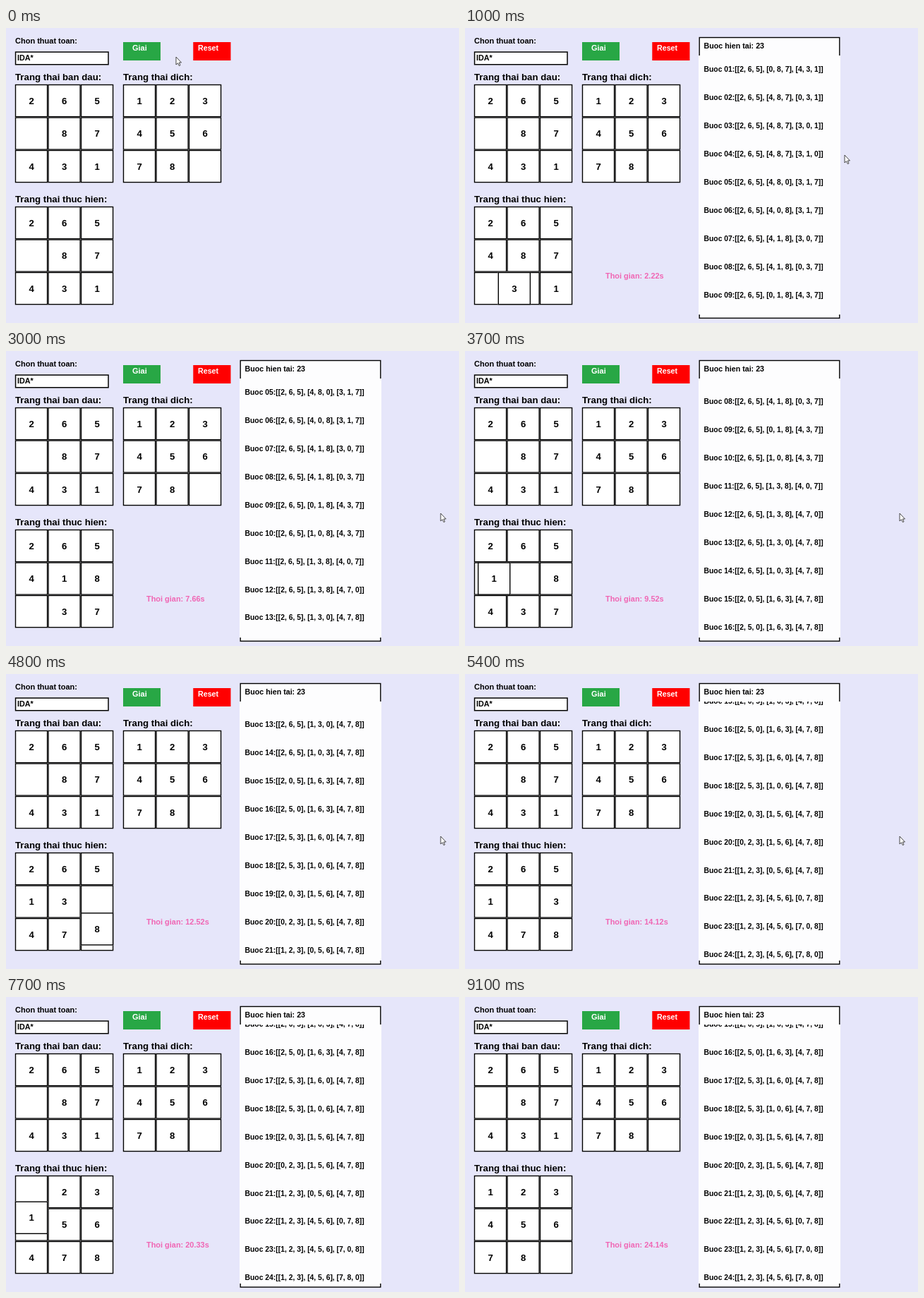
An HTML page with a canvas for the animation above (9.2 s loop, 642 px wide and 418 px high).

```html
<!DOCTYPE html>
<html>
<head>
<meta charset="utf-8">
<style>
html, body { margin: 0; width: 100%; height: 100%; overflow: hidden; background: #e6e6fa; }
canvas { display: block; }
</style>
</head>
<body>
<canvas id="stage" width="642" height="418"></canvas>
<script>
const ctx = document.getElementById('stage').getContext('2d');
const LOOP = 9200, TICK = 100, CELL = 46.5;
const SLIDE = 0.4, PERIOD = 1.0074, FIRST_END = 1.505;
const START = [2, 6, 5, 0, 8, 7, 4, 3, 1];
const GOAL = [1, 2, 3, 4, 5, 6, 7, 8, 0];
const STEP = { U: -3, D: 3, L: -1, R: 1 };

// Follow the blank through every move of the solution.
const states = [START];
for (const dir of 'DRRULDLURDRULURDLULDDRR') {
  const next = states[states.length - 1].slice();
  const from = next.indexOf(0), to = from + STEP[dir];
  next[from] = next[to];
  next[to] = 0;
  states.push(next);
}
const rows = states.map((s, i) => {
  const line = r => '[' + s.slice(r * 3, r * 3 + 3).join(', ') + ']';
  return `Buoc ${String(i + 1).padStart(2, '0')}:[${[0, 1, 2].map(line).join(', ')}]`;
});

const CLOCK = [[180, 0], [1900, 4.66], [3000, 7.66], [3700, 9.52], [4800, 12.52], [6300, 16.52], [9100, 24.14]];
const WHEEL = [[1800, 0], [1900, 1], [3000, 12], [3700, 20], [4800, 35], [5400, 43.5]];
const MOUSE_X = [[0, 241], [150, 200], [400, 200], [1000, 538], [1300, 616]];
const MOUSE_Y = [[0, 41], [150, 31], [400, 31], [1000, 180], [1300, 230]];

function track(keys, t) {
  if (t <= keys[0][0]) return keys[0][1];
  for (let i = 1; i < keys.length; i++) {
    const [t0, a] = keys[i - 1], [t1, b] = keys[i];
    if (t <= t1) return a + (b - a) * (t - t0) / (t1 - t0);
  }
  return keys[keys.length - 1][1];
}

function box(x, y, w, h, fill, border) {
  ctx.fillStyle = fill;
  ctx.fillRect(x, y, w, h);
  if (!border) return;
  ctx.strokeStyle = '#000';
  ctx.lineWidth = border;
  ctx.strokeRect(x + border / 2, y + border / 2, w - border, h - border);
}

function text(str, x, y, size, color = '#000', align = 'left') {
  ctx.font = `bold ${size}px "Liberation Sans", Arial, sans-serif`;
  ctx.textAlign = align;
  ctx.fillStyle = color;
  ctx.fillText(str, x, y + size * 0.36);
}

function tile(n, x, y) {
  box(x, y, CELL, CELL, '#fff', 1.4);
  if (n) text(n, x + CELL / 2, y + CELL / 2, 13.2, '#000', 'center');
}

function board(cells, x, y, target, amount) {
  const at = i => [x + i % 3 * CELL, y + Math.floor(i / 3) * CELL];
  const blank = cells.indexOf(0);
  const moving = amount > 0 ? target.indexOf(0) : -1;
  cells.forEach((n, i) => tile(i === moving ? 0 : n, ...at(i)));
  if (moving < 0) return;
  const [x0, y0] = at(moving), [x1, y1] = at(blank);
  tile(cells[moving], x0 + (x1 - x0) * amount, y0 + (y1 - y0) * amount);
}

function panel(t) {
  box(331.5, 12.8, 200, 399, '#fdfdfe', 1.4);
  box(331, 39, 201, 367, '#fdfdfe');
  text('Buoc hien tai: 23', 338.5, 25, 10.7);
  const wheel = track(WHEEL, t);
  const notches = wheel >= 43.5 ? wheel : Math.round(wheel);
  ctx.save();
  ctx.beginPath();
  ctx.rect(331, 39, 201, 367);
  ctx.clip();
  rows.forEach((row, i) => text(row, 338.5, 58.2 - notches * 13.32 + i * 39.95, 10.36));
  ctx.restore();
}

function pointer(x, y) {
  ctx.beginPath();
  [[0, 0], [0, 11], [2.5, 8.7], [4.3, 12.5], [6, 11.8], [4.3, 8], [7.5, 8]]
    .forEach(([dx, dy]) => ctx.lineTo(x + dx, y + dy));
  ctx.closePath();
  ctx.fillStyle = '#fff';
  ctx.fill();
  ctx.strokeStyle = '#333';
  ctx.lineWidth = 0.9;
  ctx.stroke();
}

function draw(t) {
  box(0, 0, 642, 418, '#e6e6fa');
  text('Chon thuat toan:', 13, 18, 11);
  box(12.8, 33.3, 133, 19.2, '#fff', 1.5);
  text('IDA*', 16, 41.7, 10.8);
  box(166, 20, 53, 26, '#28a745');
  text('Giai', 179, 28, 11, '#fff');
  box(265.3, 20, 53.2, 26, '#f00');
  text('Reset', 272, 28, 10.7, '#fff');

  text('Trang thai ban dau:', 13, 69.3, 13.25);
  text('Trang thai dich:', 166, 69.3, 13.25);
  text('Trang thai thuc hien:', 13, 242.3, 13.25);
  board(START, 12.8, 79.8);
  board(GOAL, 165.8, 79.8);

  const clock = track(CLOCK, t);
  const last = states.length - 1;
  const cycle = (clock - FIRST_END) / PERIOD + 1;
  const done = Math.min(last, Math.max(0, Math.floor(cycle)));
  const left = (done + 1 - cycle) * PERIOD;
  const amount = done < last ? Math.max(0, 1 - left / SLIDE) : 0;
  board(states[done], 12.8, 252.8, states[done + 1], amount);

  if (t >= 200) {
    text(`Thoi gian: ${clock.toFixed(2)}s`, 199, 351, 10.95, '#f066b4');
    panel(t);
  }
  if (t < 6700) pointer(track(MOUSE_X, t), track(MOUSE_Y, t));
}

function frame() {
  draw(Math.floor(performance.now() % LOOP / TICK) * TICK);
  requestAnimationFrame(frame);
}
frame();
</script>
</body>
</html>
```
